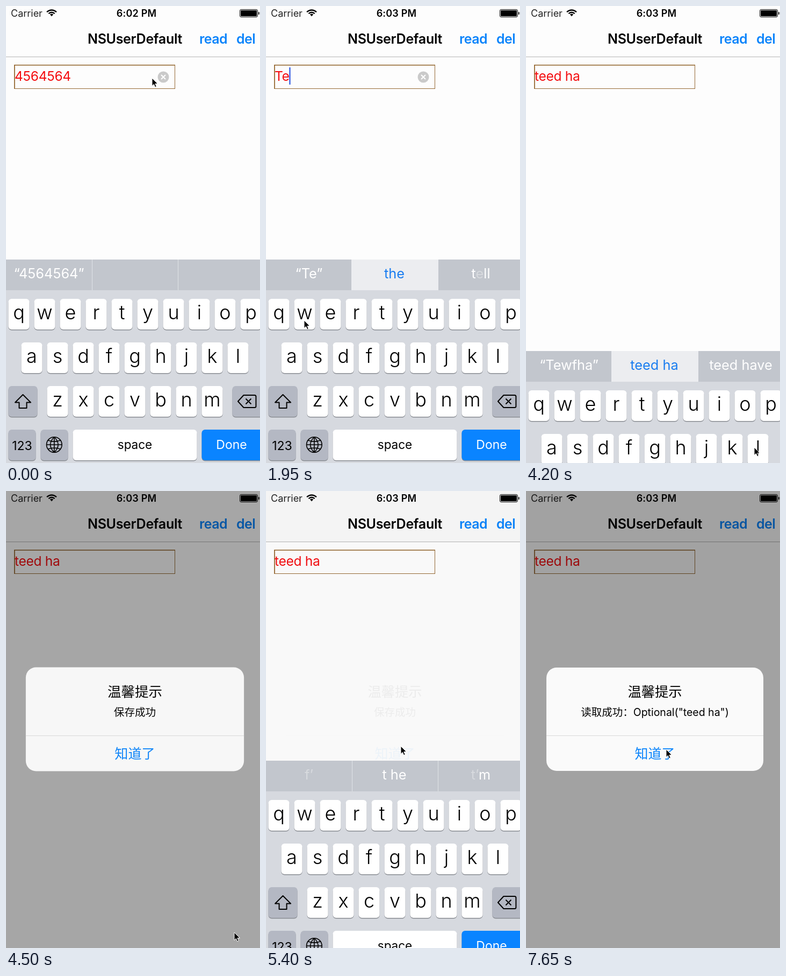
Recreate the animation shown at these times as an HTML page. Size 473 by 849 pixels, loop 8 s.

```html
<!DOCTYPE html>
<html lang="zh-CN">
<head>
<meta charset="utf-8">
<title>Saved text demo</title>
<style>
  html, body { margin: 0; width: 100%; height: 100%; overflow: hidden; background: #fdfdfd; }
  svg { display: block; width: 100vw; height: 100vh; }
  text { font-family: Inter, "Noto Sans CJK SC", "Noto Sans CJK", sans-serif; white-space: pre; }
  .mid { text-anchor: middle; }
  .status { font-size: 18px; }
  .bar { font-size: 25px; font-weight: 600; letter-spacing: -.3px; }
  .link { fill: #0b84fb; letter-spacing: -.6px; }
  .entry { font-size: 24.5px; letter-spacing: -.3px; fill: #f40d10; }
  .hint { font-size: 25.3px; text-anchor: middle; }
  .key { font-size: 36px; font-weight: 350; text-anchor: middle; }
  .wide { font-size: 23px; text-anchor: middle; }
  .line { fill: none; stroke: #000; stroke-width: 2; stroke-linejoin: round; }
</style>
</head>
<body>
<svg viewBox="0 0 473 849">
  <rect width="473" height="849" fill="#fdfdfd"/>
  <rect id="nav" width="473" height="94"/>
  <rect y="94" width="473" height="1" fill="#b4b4b4"/>

  <text class="status" x="9" y="20" fill="#222">Carrier</text>
  <g fill="none" stroke="#000" stroke-width="2.4">
    <path d="M76 11.2Q85 3.6 94 11.2M79.4 14.2Q85 9.4 90.6 14.2"/>
    <path d="M81.8 15.6Q85 13.2 88.2 15.6L85 19.2Z" fill="#000" stroke="none"/>
  </g>
  <text id="clock" class="status mid" x="243" y="20" font-weight="600" letter-spacing=".2"></text>
  <rect x="435.5" y="6.5" width="33" height="14" rx="2.5" fill="none" stroke="#000"/>
  <rect x="437" y="8" width="30" height="11" rx="1"/>
  <rect x="470" y="11" width="1.6" height="5" rx=".8"/>

  <text class="bar mid" x="240" y="70">NSUserDefault</text>
  <text class="bar link" x="360" y="70">read</text>
  <text class="bar link" x="429" y="70">del</text>

  <rect x="15" y="109" width="300" height="45" fill="#966a34"/>
  <rect x="16.8" y="110.6" width="297.2" height="42.4" fill="#fdfdfd"/>
  <text id="entry" class="entry" x="16" y="139"></text>
  <rect id="caret" y="114" width="2.6" height="32" fill="#4a6ee4"/>
  <g id="clear">
    <circle cx="293" cy="132" r="10.5" fill="#cacaca"/>
    <path d="M289 128l8 8m0-8l-8 8" stroke="#fff" stroke-width="2"/>
  </g>

  <rect id="dim" width="473" height="849"/>
  <g id="alert">
    <rect x="38" y="328" width="404" height="192" rx="19" fill="#fafafa"/>
    <rect x="38" y="454" width="404" height="1" fill="#dadada"/>
    <text class="mid" x="240" y="382" font-size="25.3" font-weight="500">温馨提示</text>
    <text id="message" class="mid" x="240" y="418" font-size="19.5"></text>
    <text class="mid" x="240" y="497" font-size="25" font-weight="500" fill="#0b84fb">知道了</text>
  </g>

  <g id="board">
    <rect y="471" width="473" height="57" fill="#c2c6cd"/>
    <rect y="528" width="473" height="330" fill="#d6d9df"/>
    <path d="M160.5 471v57M320.5 471v57" stroke="#e0e3e7"/>
    <rect id="pick" x="159" y="471" width="162" height="57" fill="#ecedf0"/>
    <g id="hints"></g>
    <g id="keys"></g>
    <path id="shift" class="line" d="M31.5 722L46 736.5H38.5V747H24.5V736.5H17Z"/>
    <path class="line" d="M432 734.5L442.5 723H463Q465.500 723 465.500 725.500V743.500Q465.500 746 463 746H442.500ZM446.500 729.500l10 10m0-10l-10 10"/>
    <text class="wide" x="30" y="825">123</text>
    <path class="line" stroke-width="1.6" style="stroke-width:1.6" d="M75.500 815a14.300 14.300 0 1 0 28.600 0a14.300 14.300 0 1 0-28.600 0zh28.600M89.800 800.700v28.600M89.800 800.700q-14.500 14.300 0 28.600q14.500-14.300 0-28.600M78.500 807q11.300 4 22.600 0M78.500 823q11.300-4 22.600 0"/>
    <text class="wide" x="240" y="823" style="font-size:22.5px">space</text>
    <text class="wide" x="420" y="823" fill="#fff">Done</text>
    <g id="popup">
      <path fill="#fff" stroke="#b5b9c0" d="M-35-82H35Q43-82 43-74V-26C43-10 20-10 20 4V51Q20 57 14 57H-14Q-20 57-20 51V4C-20-10-43-10-43-26V-74Q-43-82-35-82Z"/>
      <text id="popLetter" class="key" y="-32" style="font-size:50px"></text>
    </g>
  </g>

  <path id="pointer" d="M0 0V14.500L3.400 11.400L5.700 16.800L8.200 15.700L5.900 10.500H10.500Z" stroke="#fff" stroke-width="1"/>
</svg>
<script>
const LOOP = 8000, STEP = 150;
const el = id => document.getElementById(id);
const show = (node, on) => node.setAttribute('visibility', on ? 'inherit' : 'hidden');
const clamp = x => Math.max(0, Math.min(1, x));
const smooth = x => x * x * (3 - 2 * x);

function add(parent, tag, attrs, text) {
  const node = document.createElementNS('http://www.w3.org/2000/svg', tag);
  for (const name in attrs) node.setAttribute(name, attrs[name]);
  if (text) node.textContent = text;
  return parent.appendChild(node);
}

// Interpolates between rows of [time, ...values].
function track(rows, t, ease = x => x) {
  const next = rows.findIndex(row => row[0] > t);
  if (next < 0) return rows[rows.length - 1].slice(1);
  if (next === 0) return rows[0].slice(1);
  const a = rows[next - 1], b = rows[next];
  const k = ease((t - a[0]) / (b[0] - a[0]));
  return a.slice(1).map((v, i) => v + (b[i + 1] - v) * k);
}

// Holds the latest row that has started.
const latest = (rows, t) => rows.filter(row => row[0] <= t).pop();

const keyPlace = {}, letters = [];

function cap(x, y, w, fill) {
  add(el('keys'), 'rect', { x, y: y + 1.500, width: w, height: 57, rx: 6, fill: '#8a8d93' });
  return add(el('keys'), 'rect', { x, y, width: w, height: 57, rx: 6, fill });
}

[['qwertyuiop', 4.500, 544], ['asdfghjkl', 28.500, 625], ['zxcvbnm', 76.500, 706]].forEach(([row, left, y]) => {
  [...row].forEach((char, i) => {
    const x = left + 48 * i;
    cap(x, y, 39, '#fff');
    keyPlace[char] = [x + 19.500, y];
    letters.push([char, add(el('keys'), 'text', { class: 'key', x: x + 19.500, y: y + 38 }, char)]);
  });
});
const shiftKey = cap(4.500, 706, 54, '#b4b8c3');
cap(421.500, 706, 60, '#b4b8c3');
cap(4.500, 787, 51, '#b4b8c3');
cap(64.500, 787, 51, '#b4b8c3');
cap(124.500, 787, 231, '#fff');
cap(364.500, 787, 120, '#0a84ff');

const hints = [80, 239, 400].map(x => add(el('hints'), 'text', { class: 'hint', x, y: 506 }));

// Time, field text, three suggestions ("~" makes the next letter faint), middle one chosen.
const typing = [
  [0, '4564564', '“4564564”', '', '', false],
  [450, '', 'I', 'The', 'I’m', false],
  [1350, 'T', '“T”', 'the', 'to', false],
  [1800, 'Te', '“Te”', 'the', 't~ell', true],
  [2100, 'Te', '“Te”', 'the', 'tell', true],
  [2250, 'Tew', '“Tew”', 'few', 'tea', true],
  [2400, 'Tewf', '“Tewf”', 'teed', 'tears', true],
  [2700, 'Tewfh', '“Tewfh”', 'teed h', 'teeth', true],
  [3000, 'Tewfha', '“Tewfha”', 'teed ha', 'teed have', true],
  [4050, 'teed ha', '“Tewfha”', 'teed ha', 'teed have', true],
  [5100, 'teed ha', '~f~’', 't he', '~t~’m', false],
  [5550, 'teed ha', 'I', 'the', 'I’m', false]
];

const presses = { 1350: 'T', 1800: 'e', 2250: 'w', 2400: 'f', 2700: 'h', 3000: 'a' };

const pointerPath = [
  [0, 272, 134], [300, 292, 134], [600, 292, 134],
  [1200, 214, 578], [1350, 214, 578], [1650, 118, 574], [1800, 118, 574],
  [1950, 71, 584], [2250, 71, 584], [2400, 190, 655], [2700, 288, 655],
  [3000, 48, 655], [3150, 48, 655], [3900, 425, 820], [4500, 425, 820],
  [5100, 251, 474], [5400, 251, 474], [6150, 386, 67], [7050, 386, 67],
  [7500, 244, 508], [7650, 261, 480]
];

const boardDrop = [
  [4050, 0], [4200, 170], [4390, 380], [5160, 380], [5250, 170],
  [5400, 30], [5550, 0], [5700, 130], [5850, 330], [6000, 380]
];

function setHint(node, value, fill) {
  node.textContent = '';
  node.setAttribute('fill', fill);
  for (const part of value.match(/~.|[^~]+/g) || []) {
    const faint = part[0] === '~';
    add(node, 'tspan', { 'fill-opacity': faint ? .35 : 1 }, faint ? part[1] : part);
  }
}

function alertLevel(t) {
  const rise = (start, span) => 1 - (1 - clamp((t - start) / span)) ** 3;
  if (t < 5150) return rise(4260, 360);
  if (t < 6600) return clamp((5412 - t) / 262);
  return rise(6640, 260);
}

function drawAlert(t) {
  const level = alertLevel(t);
  const leaving = t >= 5150 && t < 6600;
  const scale = leaving ? 1 : 1 + .15 * (1 - level);
  el('dim').setAttribute('opacity', .36 * level);
  el('alert').setAttribute('opacity', level);
  el('alert').setAttribute('transform', `translate(240 424) scale(${scale}) translate(-240 -424)`);
  el('message').textContent = t < 6600 ? '保存成功' : '读取成功：Optional("teed ha")';
  el('nav').setAttribute('fill', leaving && level > 0 ? '#f8f8f8' : '#fdfdfd');
}

function drawBoard(t, row) {
  const [drop] = track(boardDrop, t);
  const upper = row[1] === '';
  el('board').setAttribute('transform', `translate(0 ${drop})`);
  show(el('board'), drop < 380);
  show(el('pick'), row[5]);
  hints.forEach((node, i) => setHint(node, row[i + 2], i === 1 && row[5] ? '#1a7df0' : '#fff'));
  for (const [char, node] of letters) node.textContent = upper ? char.toUpperCase() : char;
  shiftKey.setAttribute('fill', upper ? '#fff' : '#b4b8c3');
  el('shift').style.fill = upper ? '#000' : 'none';

  const pressed = presses[t];
  show(el('popup'), pressed);
  if (pressed) {
    el('popup').setAttribute('transform', `translate(${keyPlace[pressed.toLowerCase()]})`);
    el('popLetter').textContent = pressed;
  }
}

function draw(time) {
  const t = Math.floor(time / STEP) * STEP;
  const row = latest(typing, t);
  const focused = t < 4050;
  const blinkOff = t === 0 || (t >= 3450 && t < 3900);

  el('clock').textContent = t < 1500 ? '6:02 PM' : '6:03 PM';
  el('entry').textContent = row[1];
  el('caret').setAttribute('x', 15.500 + (row[1] ? el('entry').getComputedTextLength() : 0));
  show(el('caret'), focused && !blinkOff);
  show(el('clear'), focused && row[1]);
  drawAlert(t);
  drawBoard(t, row);
  el('pointer').setAttribute('transform', `translate(${track(pointerPath, t, smooth)})`);
}

const start = performance.now();
function tick() {
  draw((performance.now() - start) % LOOP);
  requestAnimationFrame(tick);
}
tick();
</script>
</body>
</html>
```
